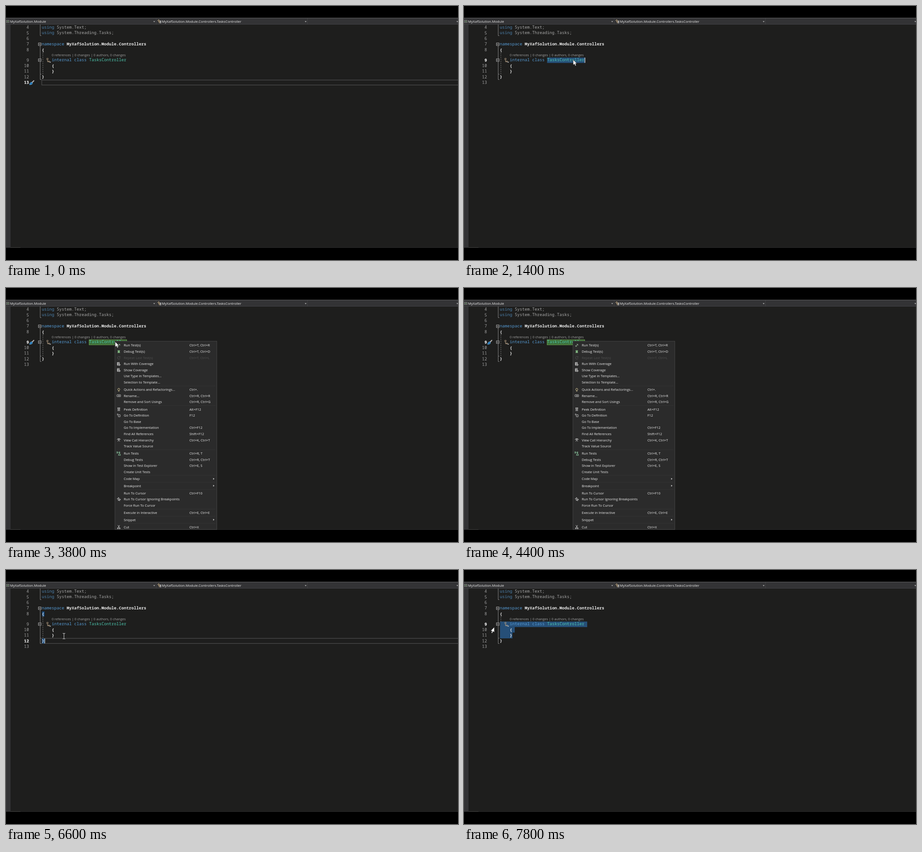
Recreate the animation shown at these times as an HTML page. Size 998 by 561 pixels, loop 8 s.

```html
<!DOCTYPE html>
<html lang="en">
<head>
<meta charset="utf-8">
<title>Code editor</title>
<style>
html, body { margin: 0; width: 100%; height: 100%; overflow: hidden; background: #000; }
svg { display: block; width: 100%; height: 100%; }
text { white-space: pre; }
.code { font: 500 9.17px "Noto Sans Mono", "DejaVu Sans Mono", monospace; fill: #dcdcdc; }
.bold { font-weight: 600; fill: #e8e8e8; }
.ui { font: 7.45px "Open Sans", "Noto Sans", sans-serif; fill: #ececec; }
.num { fill: #a2a2a2; text-anchor: end; }
.now { fill: #f4f4f4; font-weight: 600; }
.kw { fill: #569cd6; font-weight: 500; }
.type { fill: #4ec9b0; }
.dim { fill: #a8a8a8; }
.dimkw { fill: #4c82ae; }
.lens { font-size: 7.35px; fill: #a0a0a0; }
.off { fill: #505050; }
.line { fill: none; stroke: #808080; }
.row { fill: none; stroke: #4b4b4b; stroke-width: 1.3; }
.sel { fill: #264f78; }
.caret { stroke: #f0f0f0; stroke-width: 1.2; }
.ptr { fill: #fff; stroke: #111; stroke-width: .7; }

/* Timed parts stay hidden until their keyframes show them. 2.5% = 200 ms. */
.t { visibility: hidden; animation: 8s step-end infinite; }
.line13 { animation-name: line13; }
.num9 { animation-name: num9; }
.picked { animation-name: picked; }
.marked { animation-name: marked; }
.faded { animation-name: faded; }
.blink { animation-name: blink; }
.brush9 { animation-name: brush9; }
.menu { animation-name: menu; }
.line12 { animation-name: line12; }
.braces { animation-name: braces; }
.line11 { animation-name: line11; }
.drag11 { animation-name: drag11; }
.drag10 { animation-name: drag10; }
.drag9 { animation-name: drag9; }
.arrow { animation-name: arrow; }
.beam { animation-name: beam; }
.margin { animation-name: margin; }
@keyframes line13 { 0% { visibility: visible } 17.5%, to { visibility: hidden } }
@keyframes num9 { 17.5% { visibility: visible } 77.5% { visibility: hidden } 92.5%, to { visibility: visible } }
@keyframes picked { 17.5% { visibility: visible } 32.5% { visibility: hidden } }
@keyframes marked { 32.5% { visibility: visible } 47.5% { visibility: hidden } 65% { visibility: visible } 77.5% { visibility: hidden } }
@keyframes faded { 47.5% { visibility: visible } 65% { visibility: hidden } }
@keyframes blink {
  17.5% { visibility: visible } 25% { visibility: hidden }
  32.5% { visibility: visible } 37.5% { visibility: hidden }
  65% { visibility: visible } 72.5% { visibility: hidden }
}
@keyframes brush9 { 32.5% { visibility: visible } 77.5% { visibility: hidden } }
@keyframes menu { 47.5% { visibility: visible } 65% { visibility: hidden } }
@keyframes line12 { 77.5% { visibility: visible } 85% { visibility: hidden } }
@keyframes braces { 80% { visibility: visible } 85% { visibility: hidden } }
@keyframes line11 { 85% { visibility: visible } 87.5% { visibility: hidden } }
@keyframes drag11 { 87.5%, to { visibility: visible } }
@keyframes drag10 { 90%, to { visibility: visible } }
@keyframes drag9 { 92.5%, to { visibility: visible } }
@keyframes arrow {
  2.5% { visibility: visible; transform: translate(475px, 35px) } 5% { visibility: hidden }
  17.5% { visibility: visible; transform: translate(241px, 118.5px) }
  55% { visibility: hidden; transform: translate(241px, 118.5px) }
}
@keyframes beam {
  5% { visibility: visible; transform: translate(310px, 88px) }
  7.5% { visibility: visible; transform: translate(150px, 122px) }
  10% { visibility: hidden }
  12.5% { visibility: visible; transform: translate(150px, 138px) }
  15% { visibility: visible; transform: translate(238px, 123px) }
  17.5% { visibility: hidden }
  67.5% { visibility: visible; transform: translate(225px, 136px) }
  70% { visibility: visible; transform: translate(185px, 147px) }
  72.5% { visibility: visible; transform: translate(145px, 154px) }
  75% { visibility: visible; transform: translate(112px, 156px) }
  77.5% { visibility: visible; transform: translate(102px, 156px) }
  80% { visibility: visible; transform: translate(116px, 151px) }
  82.5% { visibility: visible; transform: translate(128px, 146px) }
  85% { visibility: visible; transform: translate(120px, 146px) }
  87.5% { visibility: visible; transform: translate(107px, 145px) }
  90% { visibility: visible; transform: translate(92px, 133px) }
  92.5% { visibility: hidden }
}
@keyframes margin {
  10% { visibility: visible; transform: translate(69px, 134px) } 12.5% { visibility: hidden }
  92.5% { visibility: visible; transform: translate(81px, 115px) }
  95% { visibility: visible; transform: translate(72px, 121px) }
  97.5%, to { visibility: visible; transform: translate(67px, 126px) }
}
</style>
</head>
<body>
<svg viewBox="0 0 998 561" preserveAspectRatio="none">
  <defs>
    <g id="brush">
      <path d="M5 1L10 -4" stroke="#b9b9b9" stroke-width="2.2"/>
      <path d="M0 5.5L1 2Q3 -1 5 0L6.500 2Q6 5 3 5Z" fill="#1f6fae" stroke="#68b4e6" stroke-width=".9"/>
    </g>
    <g id="fold"><path d="M-3 -3H3V3H-3Z" fill="#1e1e1e" stroke="#a5a5a5"/><path d="M-1.800 0H1.800" stroke="#ddd"/></g>
  </defs>

  <rect width="998" height="561"/>
  <rect y="26" width="998" height="508" fill="#1e1e1d"/>
  <rect y="41" width="10" height="493" fill="#333335"/>
  <rect y="26" width="998" height="15" fill="#333335"/>
  <path d="M0 26.500H998" stroke="#626264"/>
  <path d="M0 40.500H998M331.500 27V41M665.500 27V41" stroke="#454547" stroke-width=".8"/>
  <path d="M10 533.500H998" stroke="#2e2e2e"/>
  <path d="M10 533.500H32" stroke="#454545"/>
  <path d="M325.200 33.500h4l-2 2.200zM659.600 33.500h4l-2 2.200zM994.500 33.500h4l-2 2.200z" fill="#bbb"/>
  <path d="M1 31.500H7V36.500H1Z" fill="none" stroke="#8c8c8c" stroke-width=".9"/>
  <path d="M2.500 34H5.500" stroke="#7fb57f" stroke-width="1.500"/>
  <path d="M335 32l2-2 2 2-2 2zM338 34h3m-3 0v3h3" fill="none" stroke="#d5b98c"/>
  <path d="M340 32.500h2.500v2.500H340zM340 35.800h2.500v2H340z" fill="#d0d0d0"/>
  <g class="ui" style="font-size:7.55px">
    <text x="9" y="37">MyXafSolution.Module</text>
    <text x="344" y="37">MyXafSolution.Module.Controllers.TasksController</text>
  </g>

  <path class="line" d="M75.500 41V65.500H78M75.500 88V162.500H78M75.500 150.500H78"/>
  <path d="M81.500 103V151" stroke="#707070" stroke-dasharray="2.500 2"/>

  <!-- Highlights below the text -->
  <rect class="t line13 row" x="79" y="163.500" width="925" height="11"/>
  <rect class="t line12 row" x="79" y="151" width="925" height="11.300"/>
  <rect class="t line11 row" x="79" y="139" width="925" height="11.300"/>
  <path class="t braces" d="M79.500 91.500h5.500v11h-5.500zM79.500 151.200h5.500v11h-5.500z" fill="#164a7e"/>
  <rect class="t picked sel" x="183.500" y="113.800" width="83.500" height="12"/>
  <rect class="t marked" x="183.500" y="114.300" width="83" height="11.300" fill="#35806d" stroke="#58ab8a"/>
  <rect class="t faded" x="183.500" y="114.300" width="83" height="11.300" fill="#3c6c36" stroke="#67a04f"/>
  <rect class="t drag11 sel" x="79.500" y="138" width="27.500" height="13"/>
  <rect class="t drag10 sel" x="79.500" y="126" width="32.500" height="12.200"/>
  <rect class="t drag9 sel" x="79.500" y="113.800" width="192.500" height="12.300"/>

  <g class="code" id="code">
    <text x="79" y="50.200" class="dim"><tspan class="dimkw">using</tspan> System.Text;</text>
    <text x="79" y="62.400" class="dim"><tspan class="dimkw">using</tspan> System.Threading.Tasks;</text>
    <text x="79" y="86.800" class="bold"><tspan class="kw">namespace</tspan> MyXafSolution.Module.Controllers</text>
    <text x="79" y="99.500" class="bold">{</text>
    <text x="101" y="122.400"><tspan class="kw">internal class</tspan> <tspan class="type">TasksController</tspan></text>
    <text x="101" y="134.700" class="bold">{</text>
    <text x="101" y="146.800" class="bold">}</text>
    <text x="79" y="159.200" class="bold">}</text>
  </g>
  <text class="ui lens" x="101" y="110.700">0 references | 0 changes | 0 authors, 0 changes</text>
  <use href="#fold" x="74.500" y="84.500"/>
  <use href="#fold" x="74.500" y="119.500"/>
  <path d="M90 115.500h3v3h-3zM91.500 119v4h3M93 121.500h3v2h-3z" fill="none" stroke="#b09a80" stroke-width=".9"/>
  <path d="M95.500 123.200h4l-2 2.200z" fill="#ccc"/>

  <g class="code">
    <text class="t line13 num now" x="50.700" y="172.300">13</text>
    <text class="t num9 num now" x="50.700" y="122.500">9</text>
    <text class="t line12 num now" x="50.700" y="159.700">12</text>
    <text class="t line11 num now" x="50.700" y="147.300">11</text>
  </g>
  <use class="t line13" href="#brush" x="52" y="168.500"/>
  <use class="t brush9" href="#brush" x="52" y="119"/>
  <path class="t blink caret" d="M267 114V125.500"/>
  <path class="t line12 caret" d="M85.500 151.500V162"/>

  <g class="t menu ui" id="menu">
    <rect x="240.500" y="117.500" width="225" height="430" fill="#2b2b2b" stroke="#424242"/>
  </g>
  <rect y="534" width="998" height="27"/>
  <path class="t menu" d="M241 533.500H466" stroke="#505050"/>

  <path class="t arrow ptr" d="M0 0V12L2.800 9.500L4.700 13.700L6.800 12.800L5 8.800H8.500Z"/>
  <path class="t margin ptr" d="M0 0V12L-2.800 9.500L-4.700 13.700L-6.800 12.800L-5 8.800H-8.500Z"/>
  <g class="t beam">
    <path d="M-3 -6H3M0 -6V6M-3 6H3" fill="none" stroke="#000" stroke-width="2.600"/>
    <path d="M-3 -6H3M0 -6V6M-3 6H3" fill="none" stroke="#e8e8e8" stroke-width="1.100"/>
  </g>
</svg>
<script>
const add = (parent, tag, attrs, text = "") => {
  const node = document.createElementNS("http://www.w3.org/2000/svg", tag);
  for (const key in attrs) node.setAttribute(key, attrs[key]);
  node.textContent = text;
  parent.append(node);
};

// Line numbers; the code lens pushes line 9 and below down.
const code = document.getElementById("code");
for (let n = 4; n <= 13; n++) {
  const y = n < 9 ? 50.3 + (n - 4) * 12.35 : 122.5 + (n - 9) * 12.4;
  add(code, "text", { class: "num", x: 50.7, y }, n);
}

// Small icons drawn around the origin: [path, colour]
const icons = {
  run: ["M-3 3L1 -1M0 -3L3 0M-3 0L0 3M2 -3V-1", "#b9dcb9"],
  bug: ["M-1.500 -2H1.500V2.500H-1.500ZM-3 -2L3 3M3 -2L-3 3M0 -3V3", "#8cc98c"],
  redo: ["M2 -2A3 3 0 1 0 3 1M3 -3V-1H1", "#505050"],
  cover: ["M-3.500 -3H2M-3.500 -1H2M-3.500 1H0M-3.500 3H0M-3 -3V3M1 0L3.500 2L1 4Z", "#e0e0e0"],
  bulb: ["M-1 1.500A2.200 2.200 0 1 1 1 1.500V3.500H-1Z", "#e0cf9c"],
  rename: ["M-4 -2H0V2H-4ZM1 -3V3M2 -2H4V2H2", "#b8b8b8"],
  peek: ["M-3 -3H3M-2 -3V1H2V-3M-3 3H3M-1 -1H1", "#d0d0d0"],
  goto: ["M-1 -1.500H3V3H-1ZM-4 -3H-1M-3 -3V0", "#b8b8b8"],
  calls: ["M-4 -1Q0 -5 4 -1M-2 3L0 -1L2 3M-3 -2H3", "#d0d0d0"],
  tests: ["M-4 -4L-1 -2L-4 0ZM0 -3H3M1 -3V0L-1 4H4L2 0V-3", "#8cc9a0"],
  cursor: ["M-1 -4V3L1 1L2 4M-1 -4L4 1H1M-4 -1H-2", "#e0e0e0"],
  cut: ["M-2 -4L1.500 2M2 -4L-1.500 2M-3 2H-1V4H-3ZM1 2H3V4H1Z", "#c0c0c0"]
};

// Groups of [label, shortcut, icon]; a ">" shortcut opens a submenu.
const groups = [
  [126.7, ["Run Test(s)", "Ctrl+T, Ctrl+R", "run"], ["Debug Test(s)", "Ctrl+T, Ctrl+D", "bug"],
    ["Repeat Last Test(s)", "Ctrl+T, Ctrl+L", "redo"], ["Run With Coverage", "", "cover"],
    ["Show Coverage", "", "cover"], ["Use Type in Templates..."], ["Selection to Template..."]],
  [224.3, ["Quick Actions and Refactorings...", "Ctrl+.", "bulb"], ["Rename...", "Ctrl+R, Ctrl+R", "rename"],
    ["Remove and Sort Usings", "Ctrl+R, Ctrl+G"]],
  [267.8, ["Peek Definition", "Alt+F12", "peek"], ["Go To Definition", "F12", "goto"], ["Go To Base"],
    ["Go To Implementation", "Ctrl+F12"], ["Find All References", "Shift+F12"],
    ["View Call Hierarchy", "Ctrl+K, Ctrl+T", "calls"], ["Track Value Source"]],
  [365.3, ["Run Tests", "Ctrl+R, T", "tests"], ["Debug Tests", "Ctrl+R, Ctrl+T"],
    ["Show in Test Explorer", "Ctrl+E, S"], ["Create Unit Tests"]],
  [421.7, ["Code Map", ">"]],
  [437, ["Breakpoint", ">"]],
  [453, ["Run To Cursor", "Ctrl+F10"], ["Run To Cursor Ignoring Breakpoints", "", "cursor"], ["Force Run To Cursor"]],
  [496.3, ["Execute in Interactive", "Ctrl+E, Ctrl+E"]],
  [512, ["Snippet", ">"]],
  [527.8, ["Cut", "Ctrl+X", "cut"]]
];
const menu = document.getElementById("menu");
groups.forEach(([top, ...items], g) => {
  if (g) add(menu, "path", { d: `M260 ${top - 8}H463`, stroke: "#373737", "stroke-width": .8 });
  items.forEach(([label, keys, icon], i) => {
    const y = top + i * 13.6;
    const cls = icon === "redo" ? "off" : "";
    add(menu, "text", { x: 260, y: y + 2.7, class: cls }, label);
    if (keys === ">") add(menu, "path", { d: `M457.500 ${y - 2.2}l2.500 2l-2.500 2z`, fill: "#ddd" });
    else if (keys) add(menu, "text", { x: 405, y: y + 2.7, class: cls }, keys);
    if (icon) {
      const [d, stroke] = icons[icon];
      add(menu, "path", { d, stroke, fill: "none", "stroke-width": 1, transform: `translate(249 ${y})` });
    }
  });
});
</script>
</body>
</html>
```
